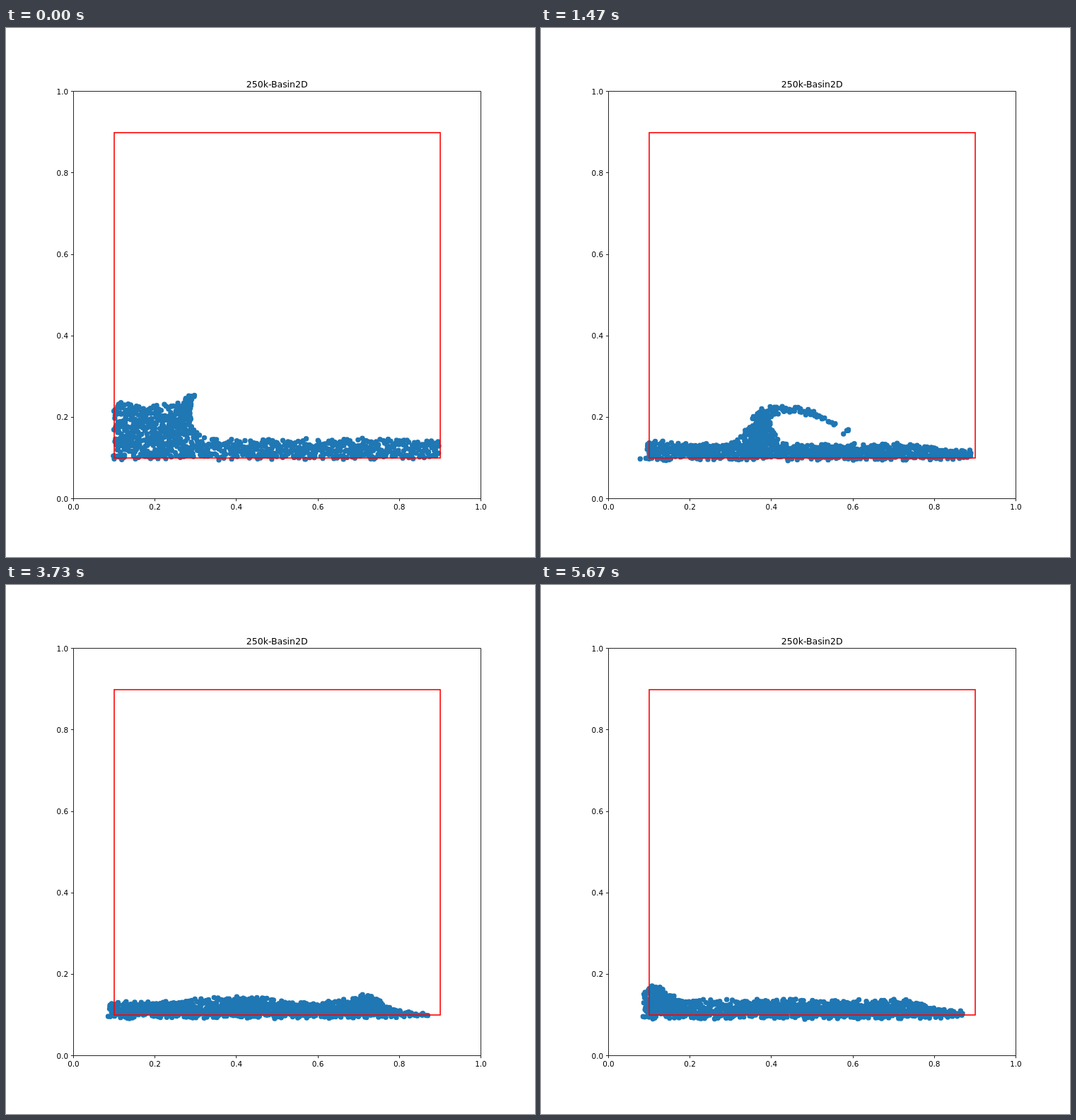
Recreate the animation shown at these times as an HTML page with a canvas. Size 748 by 748 pixels, loop 5710 ms.

```html
<!DOCTYPE html>
<html lang="en">
<head>
<meta charset="utf-8">
<title>Particle basin</title>
<style>
  html, body { margin: 0; width: 100%; height: 100%; overflow: hidden; background: #fff; }
  canvas, svg { position: absolute; left: 0; top: 0; width: 748px; height: 748px; }
  text { font-family: "DejaVu Sans", sans-serif; font-size: 10.39px; fill: #000; }
  .title { font-size: 12.47px; }
</style>
</head>
<body>
<canvas id="water" width="748" height="748"></canvas>
<svg id="axes" viewBox="0 0 748 748"></svg>
<script>
const LOOP = 5710, STEP = 100 / 3, LAST = 170;
const SIZE = 576, LEFT = 95.4, BOTTOM = 665.7;
const px = v => LEFT + SIZE * v;
const py = v => BOTTOM - SIZE * v;

const smooth = (v, a, b) => {
  const p = Math.min(1, Math.max(0, (v - a) / (b - a)));
  return p * p * (3 - 2 * p);
};
const bell = d => Math.exp(-d * d);

let seed = 20417;
function rand() {
  seed = (seed * 1664525 + 1013904223) >>> 0;
  return seed / 4294967296;
}
const spread = r => (rand() * 2 - 1) * r;

// State of the water at time t in seconds; lengths are in axis units.
function waterAt(t) {
  const crest = .27 + .13 * (1 - Math.exp(-t / .8));
  const crestHeight = .088 * (1 - smooth(t, 1.2, 4.6));
  const crestLeft = .045 + .25 * Math.exp(-t / .15) + .12 * smooth(t, 1.5, 4.5);
  const crestRight = .024 + .1 * smooth(t, 1.5, 3.5);
  const level = .135 + .01 * Math.exp(-t / .5) - .014 * bell((t - 2.87) / 1.1);
  const taper = .025 * smooth(t, 0, 3);
  const slosh = .02 * Math.exp(-t / 1.2) + .033 * smooth(t, 3.9, 5.4);
  const splash = .027 * smooth(t, 1.9, 2.8) * (1 - smooth(t, 3.4, 4.6));
  const splashX = .69 + .035 * (t - 2.87);

  return {
    crest,
    start: .1 - .013 * smooth(t, 0, 3),
    end: .897 - .027 * smooth(t, 0, 4.5),
    floor: .0985 - .001 * t,
    surface(x) {
      const d = x - crest;
      return level - taper * smooth(x, .7, .88)
        + crestHeight * bell(d / (d < 0 ? crestLeft : crestRight))
        + slosh * bell((x - .115) / .04)
        + splash * bell((x - splashX) / .04);
    }
  };
}

const grains = Array.from({ length: 950 }, (_, i) => ({
  h: (i * .618034 + rand() * .35) % 1,
  dx: spread(.0035),
  dy: spread(.005)
}));

// Spreads the grains over the water, packing deep parts more tightly.
function drawBody(w) {
  const bins = 400, dx = (w.end - w.start) / bins;
  const tops = [], sums = [0];
  for (let i = 0; i < bins; i++) {
    tops.push(w.surface(w.start + dx * (i + .5)));
    sums.push(sums[i] + Math.pow(tops[i] - w.floor, 1.2));
  }
  let bin = 0;
  grains.forEach((g, i) => {
    const goal = (i + .5) / grains.length * sums[bins];
    while (sums[bin + 1] < goal) bin++;
    const part = (goal - sums[bin]) / (sums[bin + 1] - sums[bin]);
    const x = w.start + dx * (bin + part);
    dot(x + g.dx, w.floor + g.h * (tops[bin] - w.floor) + g.dy);
  });
}

// The jet thins towards its tip, with a few loose drops in front.
const jet = Array.from({ length: 64 }, (_, i) => {
  const s = i < 60 ? i / 66 : 1;
  const wide = s < 1 ? .003 + .01 * (1 - s) : .008;
  return { s, dx: spread(wide), dy: spread(wide) };
});

function drawJet(t, w) {
  const fall = smooth(t, 1.5, 2.9);
  const rootX = w.crest + .005, rootY = .205 - .1 * fall;
  const tipX = .29 + .44 * (1 - Math.exp(-t / 1.35));
  const tipY = Math.max(.25 - .013 * t - .03 * t * t, w.surface(tipX));
  const bendX = rootX + (tipX - rootX) * .35, bendY = .25 - .15 * fall;
  for (const { s, dx, dy } of jet) {
    const q = 1 - s;
    const curve = (a, b, c) => q * q * a + 2 * q * s * b + s * s * c;
    dot(curve(rootX, bendX, tipX) + dx, curve(rootY, bendY, tipY) + dy);
  }
}

// Drops that slip through the left wall and speed up.
const LEAK_STARTS = [1, 2.3, 4.1, 4.18];
function drawLeaks(t) {
  LEAK_STARTS.forEach((start, i) => {
    const age = Math.max(0, t - start);
    dot(.1 - .1 * age * age, .098 + .004 * (i % 3));
  });
}

const ctx = document.getElementById("water").getContext("2d");
ctx.fillStyle = "#1f77b4";
ctx.beginPath();
ctx.rect(95.5, 89.5, 576, 576);
ctx.clip();

function dot(x, y) {
  const cx = px(x), cy = py(y);
  ctx.moveTo(cx + 3.7, cy);
  ctx.arc(cx, cy, 3.7, 0, Math.PI * 2);
}

function draw(ms) {
  const t = ms / 1000, w = waterAt(t);
  ctx.clearRect(0, 0, 748, 748);
  ctx.beginPath();
  drawBody(w);
  drawJet(t, w);
  drawLeaks(t);
  ctx.fill();
}

function buildAxes() {
  const label = (x, y, anchor, text, cls = "") =>
    `<text class="${cls}" x="${x}" y="${y}" text-anchor="${anchor}">${text}</text>`;
  const crisp = v => Math.floor(v) + .5;
  let ticks = "", labels = "";
  for (let i = 0; i <= 5; i++) {
    const v = i / 5, x = px(v), y = py(v);
    ticks += `M${crisp(x)} 665.5v3.6M95.5 ${crisp(y)}h-3.6`;
    labels += label(x, 681.3, "middle", v.toFixed(1)) + label(88.1, y + 3.9, "end", v.toFixed(1));
  }
  document.getElementById("axes").innerHTML =
    `<rect x="153" y="148" width="461" height="460" fill="none" stroke="#f00" stroke-width="1.6"/>` +
    `<path d="M95.5 89.5h576v576h-576z${ticks}" fill="none" stroke="#000" stroke-width=".85"/>` +
    labels + label(383.2, 83.6, "middle", "250k-Basin2D", "title");
}

const stepStart = k => Math.round(k * STEP / 10) * 10;
let shown = -1;
function tick() {
  const t = performance.now() % LOOP;
  let k = Math.min(LAST, Math.ceil(t / STEP) + 1);
  while (k > 0 && stepStart(k) > t) k--;
  if (k !== shown) draw(stepStart(k));
  shown = k;
  requestAnimationFrame(tick);
}

buildAxes();
tick();
</script>
</body>
</html>
```
